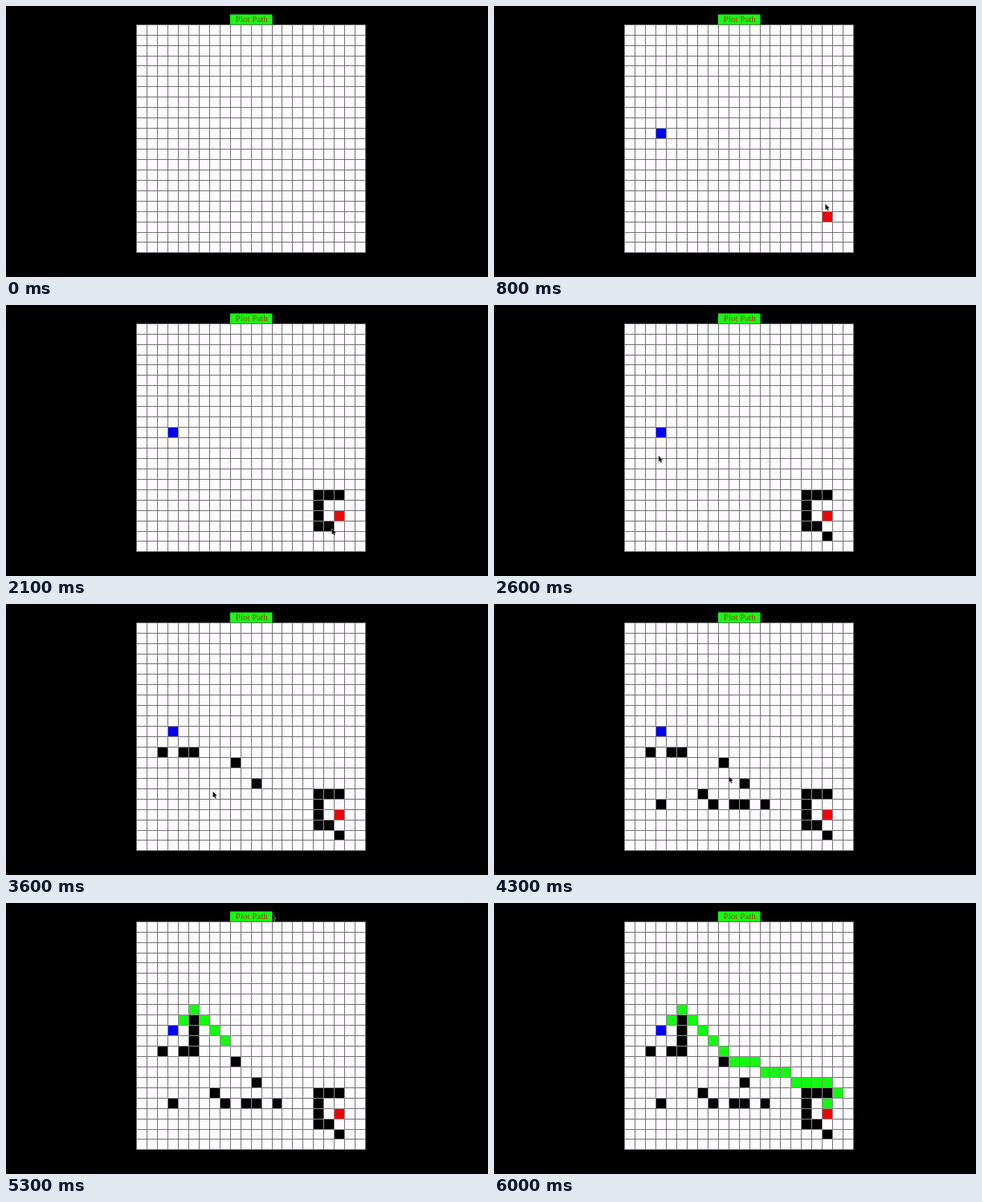
These frames come from a looping animation (600 px wide and 338 px high, 6.3 s). An HTML page with a canvas:

```html
<!DOCTYPE html>
<html lang="en">
<head>
<meta charset="utf-8">
<title>Plot Path</title>
<style>
  html, body { margin: 0; width: 100%; height: 100%; overflow: hidden; background: #000; }
  canvas { display: block; }
</style>
</head>
<body>
<canvas id="stage" width="600" height="338"></canvas>
<script>
const ctx = document.getElementById('stage').getContext('2d');
const LOOP = 6300, STEP = 100;
const COUNT = 22, PITCH = 12.94, LEFT = 162.8, TOP = 23.2;
const GREEN = '#14fb12', LINE = '#737173', EDGE = '#8a888a';

// A stroke visits cells, one every `pace` steps; each move is a run of u/d/l/r.
function stroke(at, col, row, color, moves = '', pace = 1) {
  const cells = [{ at, col, row, color }];
  for (const move of moves.split(' ').filter(Boolean)) {
    const count = d => move.split(d).length - 1;
    col += count('r') - count('l');
    row += count('d') - count('u');
    at += pace;
    cells.push({ at, col, row, color });
  }
  return cells;
}

// Cells visited by the pointer; those without a colour stay unpainted
const visits = [
  stroke(1, 7, 3),
  stroke(3, 3, 10, '#0000f4'),
  stroke(7, 19, 18, '#ee0404'),
  stroke(9, 19, 16, '#000', 'l l d d d r rd', 1.85),
  stroke(27, 2, 12, '#000', 'rr r', 2),
  stroke(34, 9, 13, '#000', 'rrdd lllld lllld rrrrr rr r rr', 1.05),
  stroke(45, 5, 11, '#000', 'u u', 1.5),
  stroke(52, 12.7, -1),
  stroke(54, 12.7, -1)
].flat();

const route = stroke(51, 4, 9, GREEN, 'ur rd rd rd rd rd r r rd r r rd r r r rd ld', 0.5);
const painted = [...route, ...visits.filter(v => v.color)];

const gx = i => Math.floor(LEFT + i * PITCH);
const gy = i => Math.floor(TOP + i * PITCH);
const mix = (a, b, k) => a + (b - a) * k;
const ease = u => u * u * u * (u * (u * 6 - 15) + 10);

function rect(x, y, w, h, color) {
  ctx.fillStyle = color;
  ctx.fillRect(x, y, w, h);
}

function cell({ col, row, color }) {
  const x = gx(col), y = gy(row), w = gx(col + 1) - x, h = gy(row + 1) - y;
  rect(x, y, w + 1, h + 1, EDGE);
  rect(x + 1, y + 1, w - 1, h - 1, color);
}

function drawGrid() {
  const x = gx(0), y = gy(0), w = gx(COUNT) - x + 1, h = gy(COUNT) - y + 1;
  rect(x, y, w, h, '#fffcff');
  for (let i = 0; i <= COUNT; i++) {
    rect(gx(i), y, 1, h, LINE);
    rect(x, gy(i), w, 1, LINE);
  }
}

function drawButton() {
  rect(279, 10.5, 52.5, 12.5, GREEN);
  ctx.font = '11px "Liberation Serif", serif';
  ctx.textAlign = 'center';
  ctx.fillStyle = '#a53a08';
  ctx.fillText('Plot Path', 305.8, 20);
}

function drawPointer(step) {
  const next = visits.findIndex(v => v.at > step);
  if (next < 1 && step !== visits.at(-1).at) return;
  const b = next < 1 ? visits.at(-1) : visits[next];
  const a = next < 1 ? b : visits[next - 1];
  const k = a === b ? 1 : ease((step - a.at) / (b.at - a.at));
  ctx.save();
  ctx.translate(LEFT + (mix(a.col, b.col, k) + 0.3) * PITCH, TOP + (mix(a.row, b.row, k) + 0.3) * PITCH);
  const arrow = new Path2D('M0 0V7L1.6 5.6L2.7 8.2L3.9 7.7L2.8 5.2L4.9 5Z');
  ctx.strokeStyle = '#c8c6c8';
  ctx.stroke(arrow);
  ctx.fillStyle = '#111';
  ctx.fill(arrow);
  ctx.restore();
}

function draw(step) {
  rect(0, 0, 600, 338, '#000');
  drawButton();
  drawGrid();
  painted.filter(p => p.at <= step).forEach(cell);
  drawPointer(step);
}

const start = performance.now();
function tick() {
  draw(Math.floor(((performance.now() - start) % LOOP) / STEP));
  requestAnimationFrame(tick);
}
tick();
</script>
</body>
</html>
```
